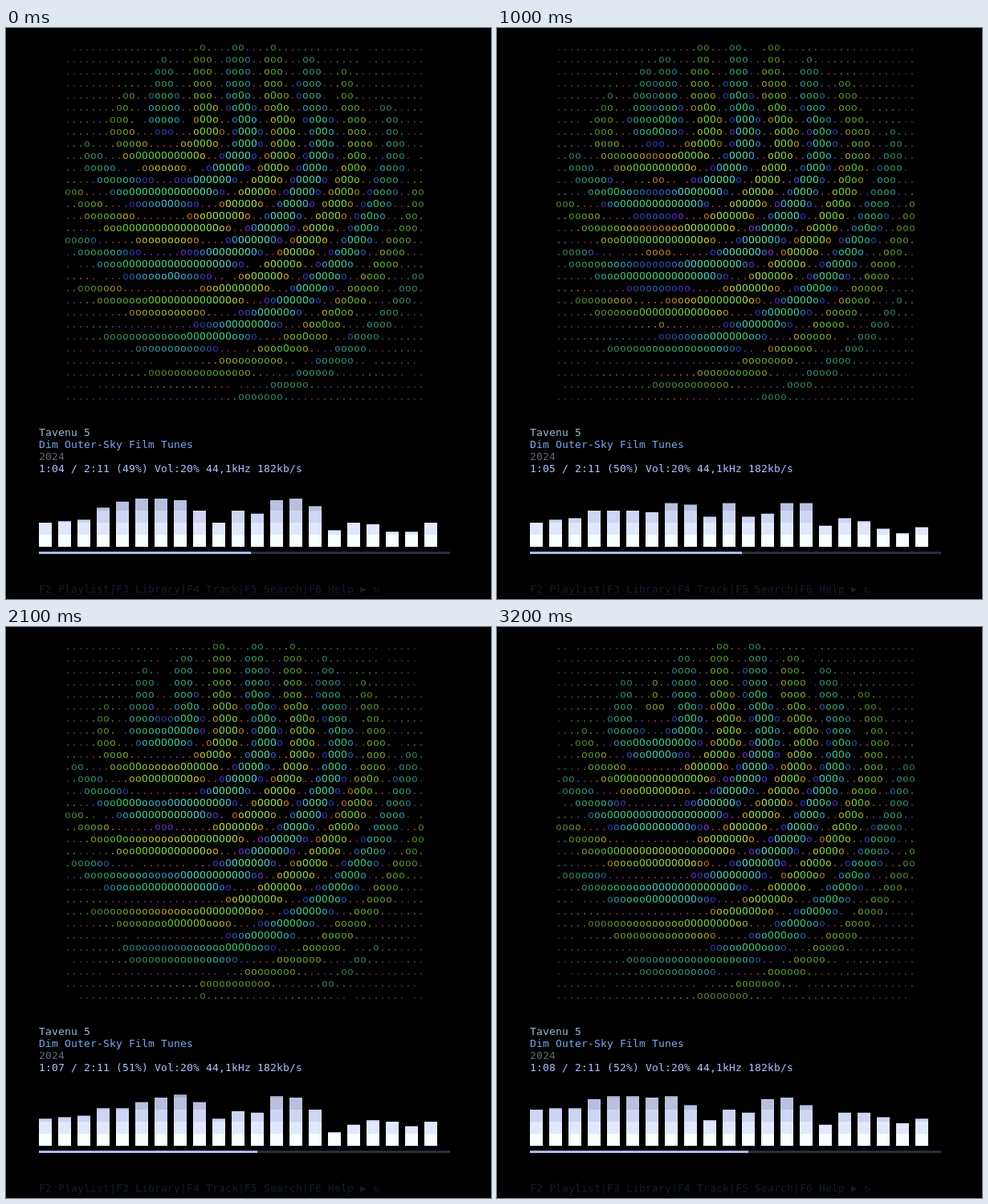
These frames come from a looping animation (604 px wide and 711 px high, 3300 ms). An HTML page with a canvas:

```html
<!DOCTYPE html>
<html lang="en">
<head>
<meta charset="utf-8">
<title>Terminal player</title>
<style>
  html, body {
    margin: 0;
    width: 100%;
    height: 100%;
    overflow: hidden;
    background: #000;
  }
  canvas { position: absolute; left: 0; top: 0; }
  .line {
    position: absolute;
    left: 41px;
    font: 13px/15px "DejaVu Sans Mono", monospace;
    letter-spacing: .174px;
    white-space: pre;
  }
  .title { top: 496px; color: #9fb9d6; }
  .album { top: 511px; color: #7aa9f2; }
  .year { top: 526px; color: #616879; }
  .status { top: 541px; color: #a8c2ff; }
  .keys { top: 691px; color: #171b2c; }
</style>
</head>
<body>
<canvas id="view" width="604" height="711"></canvas>
<div class="line title">Tavenu 5</div>
<div class="line album">Dim Outer-Sky Film Tunes</div>
<div class="line year">2024</div>
<div class="line status" id="status"></div>
<div class="line keys">F2 Playlist|F3 Library|F4 Track|F5 Search|F6 Help ▶ ↻</div>
<script>
const LOOP = 3300, STEP = 100;
const CELL_W = 8, CELL_H = 15;
const COLS = 56, ROWS = 30;
const TRACK_START = 64.95, TRACK_LENGTH = 131;

const ctx = document.getElementById('view').getContext('2d');
const status = document.getElementById('status');

// Mean bar heights in eighths of a text row.
const mean = [19,20,21,26,27,28,28,30,26,17,25,21,29,31,27,12,18,17,13,11,16];
// Time, then the swing of every second bar around its mean.
const swings = [
  [0, -3,-3,3,4,-2,-1,2,0,-2,-3,0],
  [400, 10,10,6,4,1,-1,0,-3,3,3,0],
  [800, -3,-2,-3,-9,-2,4,-13,5,6,0,-3],
  [1300, -2,-2,-3,0,9,3,3,-2,-6,-3,-2],
  [2100, -1,-1,-2,4,3,-2,4,-3,-4,3,0],
  [2800, -3,-4,-6,-7,-11,0,0,2,1,-3,0],
  [3200, 5,4,6,4,1,-1,2,0,4,6,2]
];
const barColors = ['#f7ffff', '#e1e7ff', '#cdd5f3', '#b9c0de', '#a7adc8'];

const clamp = x => Math.max(0, Math.min(1, x));
const smooth = x => { x = clamp(x); return x * x * (3 - 2 * x); };

// Signed ripple, -1 to 1, spreading from a point at the upper left.
function ripple(x, y, t) {
  const r = Math.hypot(x - 197, Math.max(0, y - 95)) + 21 * smooth((150 - y) / 75);
  const v = Math.cos(2 * Math.PI * (r - 158.5 - t * .0107) / 90.5) - .14;
  return v > 0 ? v / .86 : v / 1.14;
}

function drawRipple(t) {
  ctx.font = '13px "DejaVu Sans Mono", monospace';
  ctx.textBaseline = 'alphabetic';
  for (let row = 0; row < ROWS; row++) {
    for (let col = 0; col < COLS; col++) {
      const x = 77 + col * CELL_W, y = 24 + row * CELL_H;
      const v = ripple(x, y, t), size = Math.abs(v);
      const d = Math.hypot(x - 300, y - 242);
      const glow = Math.max(0, 1 - (d / 275) ** 2);
      const n = size * glow;
      if (size * (1.05 - d / 310) < .012) continue;
      const hue = (340 + v * (v > 0 ? 125 : 200)) % 360;
      ctx.fillStyle = `hsl(${hue}, ${30 + 35 * glow}%, ${20 + 22 * glow + 22 * n}%)`;
      ctx.fillText(n > .64 ? 'O' : n > .31 ? 'o' : '.', x - 4, y + 4);
    }
  }
}

function swing(set, bar) {
  const i = 1 + (bar >> 1);
  return bar % 2 ? (set[i] + set[i + 1]) / 2 : set[i];
}

function drawBars(t) {
  let i = 1;
  while (i < swings.length - 1 && t > swings[i][0]) i++;
  const a = swings[i - 1], b = swings[i];
  const k = clamp((t - a[0]) / (b[0] - a[0]));
  mean.forEach((base, bar) => {
    const height = Math.round(base + swing(a, bar) * (1 - k) + swing(b, bar) * k);
    for (let row = 0; row * 8 < height; row++) {
      const h = Math.min(8, height - row * 8) * CELL_H / 8;
      ctx.fillStyle = barColors[row];
      ctx.fillRect(41 + bar * 24, 646 - row * CELL_H - h, 16, h);
    }
  });
}

function drawProgress(part) {
  ctx.fillStyle = '#2b2d40';
  ctx.fillRect(41, 652, 512, 3);
  ctx.fillStyle = '#a9b9fa';
  ctx.fillRect(41, 652, (Math.round(part * 64) + 1) * CELL_W, 3);
}

function showStatus(pos, part) {
  const sec = String(Math.floor(pos) % 60).padStart(2, '0');
  const text = `${Math.floor(pos / 60)}:${sec} / 2:11 (${Math.floor(part * 100)}%) Vol:20% 44,1kHz 182kb/s`;
  if (status.textContent !== text) status.textContent = text;
}

function draw(t) {
  const pos = TRACK_START + t / 1000, part = pos / TRACK_LENGTH;
  ctx.clearRect(0, 0, 604, 711);
  drawRipple(t);
  drawBars(t);
  drawProgress(part);
  showStatus(pos, part);
}

const start = performance.now();
let last = -1;
function tick() {
  const t = Math.floor((performance.now() - start) % LOOP / STEP) * STEP;
  if (t !== last) draw(last = t);
  requestAnimationFrame(tick);
}
tick();
</script>
</body>
</html>
```
